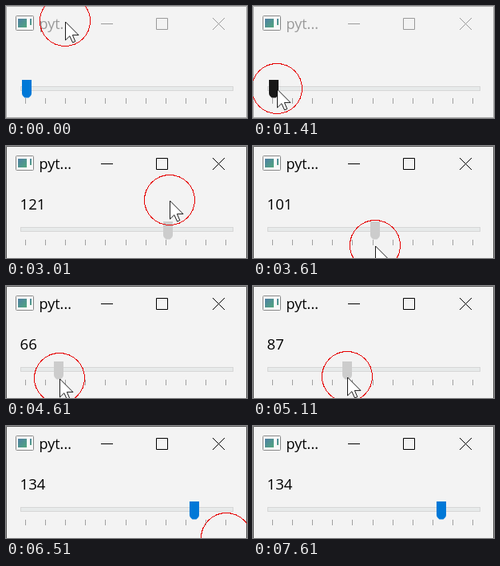
These frames come from a looping animation (302 px wide and 141 px high, 7.71 s). An HTML page:

```html
<!DOCTYPE html>
<html lang="en">
<head>
<meta charset="utf-8">
<title>Slider</title>
<style>
  html, body { margin: 0; width: 100%; height: 100%; overflow: hidden; background: #f3f3f3; }
  svg { display: block; width: 302px; height: 141px; }
  text { font: 18px "Open Sans", "Noto Sans", sans-serif; }
  #value { font-size: 18.6px; }
  .crisp { shape-rendering: crispEdges; }
</style>
</head>
<body>
<svg viewBox="0 0 302 141">
  <defs>
    <linearGradient id="tint" x1="0" y1="0" x2="1" y2="1">
      <stop offset="0" stop-color="#4f7fa6"/>
      <stop offset="1" stop-color="#52a77d"/>
    </linearGradient>
  </defs>
  <rect width="302" height="141" fill="#f3f3f3"/>
  <path id="border" d="M.5 141V.5H301.5V141" fill="none"/>
  <path id="base" d="M0 140.5H302" stroke="#aaa"/>

  <rect x="12.5" y="12.5" width="22" height="18" rx="1" fill="#f8f8f8" stroke="#888"/>
  <rect x="15" y="16" width="11" height="11" fill="url(#tint)"/>
  <rect x="30" y="16" width="2" height="8" fill="url(#tint)"/>

  <text id="title" x="41.5" y="29">pyt...</text>
  <path id="buttons" d="M119 22.5H134M188.5 15.5H202.5V29.5H188.5ZM259 15L274 30M274 15L259 30" fill="none"/>

  <text id="value" x="17.5" y="80"></text>
  <rect id="track" x="18.5" width="266" height="5" fill="#e7eaea" stroke="#d6d6d6"/>
  <path id="ticks" class="crisp" stroke="#a0a0a0"/>
  <path id="handle" d="M-6 0H6V17Q6 19 4.5 20.5L2.5 22.5H-2.5L-4.5 20.5Q-6 19 -6 17Z"/>

  <g id="pointer">
    <circle class="crisp" r="31.5" fill="none" stroke="#e60000"/>
    <path d="M.5 1V24L5.8 18.8L9.6 27L12.8 25.6L9.4 17.6H17Z" fill="#fff" stroke="#000" stroke-width=".9" stroke-linejoin="round"/>
  </g>
</svg>
<script>
const LOOP = 7710, STEP = 100;
const PRESS = 2010, DRAG = 2210, RELEASE = 6410;
const MIN = 50, MAX = 150, LEFT = 26, PER_UNIT = 2.5;

// Pointer turning points and pauses: time, x, y
const path = [
  [0, 74, 19], [610, 36, 117], [1110, 36, 116], [1410, 30, 104],
  [1610, 30, 100], [2110, 30, 100], [2410, 85, 108], [2710, 269, 32],
  [2910, 217, 56], [3610, 153, 125], [4610, 67, 116], [5990, 237, 112],
  [6410, 237, 112], [6650, 340, 190]
];

const $ = id => document.getElementById(id);
const set = (id, attrs) => {
  for (const key in attrs) $(id).setAttribute(key, attrs[key]);
};

// Smooth curve through the points that never overshoots them
const slope = (i, axis) => path[i] && path[i + 1]
  ? (path[i + 1][axis] - path[i][axis]) / (path[i + 1][0] - path[i][0])
  : 0;

function tangent(i, axis) {
  const a = slope(i - 1, axis), b = slope(i, axis);
  return a * b > 0 ? 2 * a * b / (a + b) : 0;
}

function pointerAt(time) {
  const t = Math.min(time, path.at(-1)[0]);
  const i = Math.max(1, path.findIndex(p => p[0] >= t)) - 1;
  const span = path[i + 1][0] - path[i][0];
  const k = (t - path[i][0]) / span;
  return [1, 2].map(axis => {
    const ease = k * k * (3 - 2 * k);
    const from = path[i][axis], to = path[i + 1][axis];
    const bend = k * (1 - k) ** 2 * tangent(i, axis) - k * k * (1 - k) * tangent(i + 1, axis);
    return Math.round(from + (to - from) * ease + bend * span);
  });
}

function valueAt(t) {
  if (t < DRAG) return MIN;
  const [x] = pointerAt(Math.min(t, RELEASE));
  const value = Math.round(MIN + (x - LEFT - .5) / PER_UNIT);
  return Math.max(MIN, Math.min(MAX, value));
}

function draw(time) {
  const t = Math.floor(time / STEP) * STEP + 10;
  const active = t >= PRESS && !(t >= 7410 && t < 7610);
  const moved = t >= DRAG;
  const [x, y] = pointerAt(t);
  const value = valueAt(t);
  const hx = Math.floor(LEFT + (value - MIN) * PER_UNIT), hy = moved ? 95 : 93;
  const pressed = t >= PRESS && t < RELEASE;
  const hover = Math.abs(x - hx) <= 6 && y >= hy && y <= hy + 23;
  const ink = active ? "#000" : "#999";

  set("border", { stroke: active ? "#555" : "#aaa" });
  set("base", { opacity: active ? 0 : 1 });
  set("title", { fill: ink });
  set("buttons", { stroke: ink });
  $("value").textContent = moved ? value : "";
  set("track", { y: moved ? 102.5 : 101.5 });
  set("ticks", { transform: `translate(0 ${moved ? 2 : 0})` });
  set("handle", {
    transform: `translate(${hx} ${hy})`,
    fill: pressed ? "#ccc" : hover ? "#171717" : "#0078d7"
  });
  set("pointer", { transform: `translate(${x} ${y})` });
}

const ticks = Array.from({ length: 11 }, (_, i) => `M${Math.floor(24.5 + i * 25.1) + .5} 116v7`);
set("ticks", { d: ticks.join("") });

const start = performance.now();
function loop() {
  draw((performance.now() - start) % LOOP);
  requestAnimationFrame(loop);
}
loop();
</script>
</body>
</html>
```
